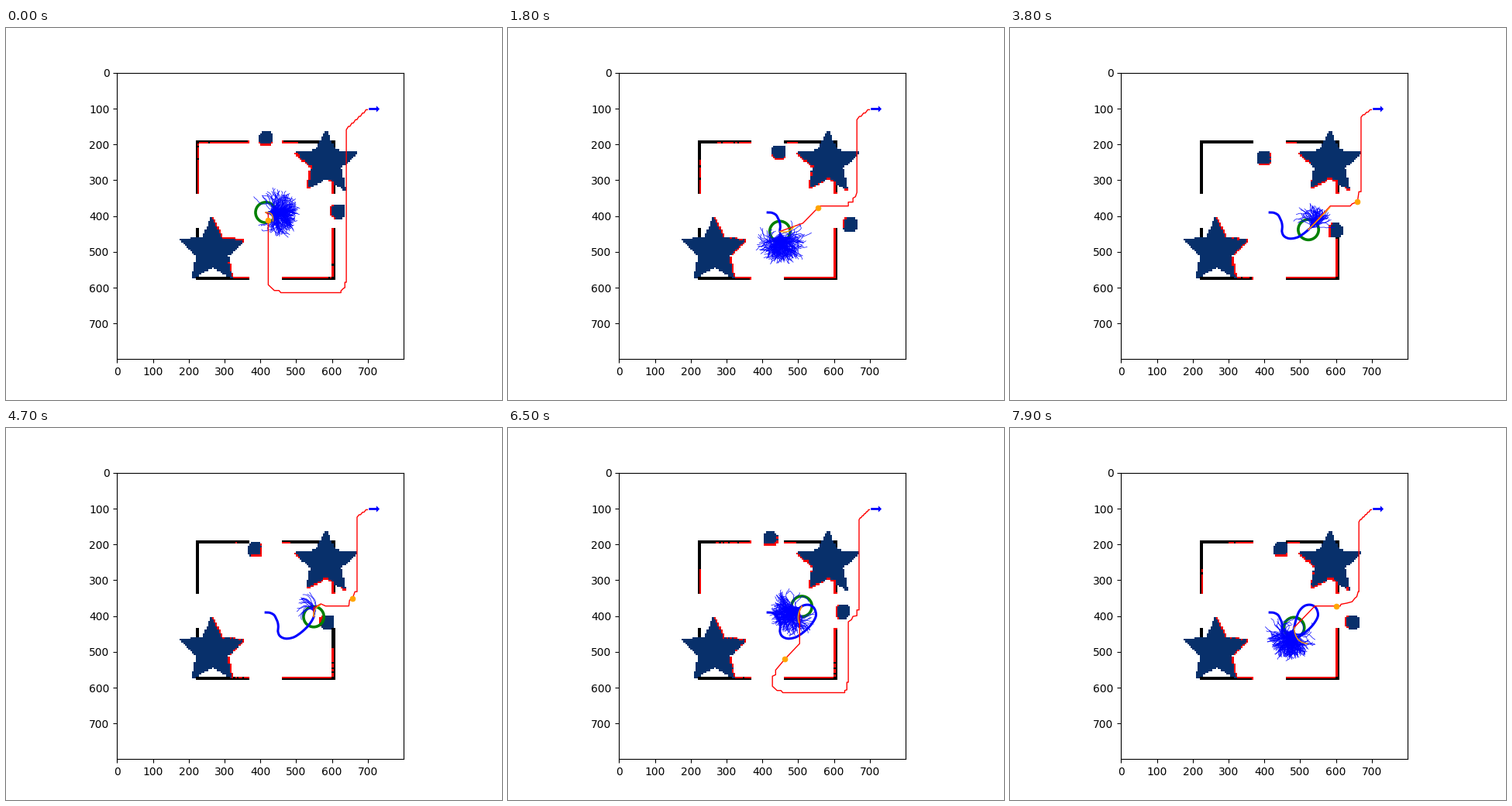
Recreate the animation shown at these times as a matplotlib script. Size 640 px wide and 480 px high, loop 8 s.

```python
import numpy as np
import matplotlib.pyplot as plt
from matplotlib.animation import FuncAnimation
from matplotlib.collections import LineCollection
from matplotlib.colors import ListedColormap
from matplotlib.path import Path

FRAMES, INTERVAL = 80, 100
SIZE, CELL = 800, 5
N = SIZE // CELL
FREE, WALL, BLOCK, HIT = range(4)
LIDAR_RANGE = 300
GOAL = (699, 103)

centers = (np.arange(N) + 0.5) * CELL
GX, GY = np.meshgrid(centers, centers)


def star(cx, cy, r, inner=0.47):
    a = -np.pi / 2 + np.arange(10) * np.pi / 5
    rad = np.where(np.arange(10) % 2, inner * r, r)
    shape = Path(np.c_[cx + rad * np.cos(a), cy + rad * np.sin(a)])
    mask = np.zeros(GX.shape, bool)
    for dx in (-2.4, 2.4):
        for dy in (-2.4, 2.4):
            pts = np.c_[GX.ravel() + dx, GY.ravel() + dy]
            mask |= shape.contains_points(pts).reshape(GX.shape)
    return mask


def static_map():
    grid = np.zeros((N, N), int)
    ring = (GX > 220) & (GX < 610) & (GY > 190) & (GY < 580)
    ring &= ~((GX > 230) & (GX < 600) & (GY > 200) & (GY < 570))
    doors = ((GX > 370) & (GX < 460)) | ((GY > 340) & (GY < 435))
    grid[ring & ~doors] = WALL
    grid[star(267, 497, 94) | star(583, 253, 90)] = BLOCK
    return grid


BASE = static_map()


def world(n):
    """Map with the two circling obstacles placed."""
    grid = BASE.copy()
    a = 0.1 * n - np.pi / 2
    for cx, cy in ((417, 216), (617, 418)):
        dx = abs(GX - cx - 30 * np.cos(a))
        dy = abs(GY - cy - 30 * np.sin(a))
        grid[(np.maximum(dx, dy) < 20) & (dx + dy < 32)] = BLOCK
    return grid


RAYS = np.radians(np.arange(360))[:, None]
REACH = np.arange(0, LIDAR_RANGE, 1.5)[None, :]


def scan(grid, x, y):
    """Mark the first occupied cell along every lidar ray."""
    col = ((x + REACH * np.cos(RAYS)) / CELL).astype(int).clip(0, N - 1)
    row = ((y + REACH * np.sin(RAYS)) / CELL).astype(int).clip(0, N - 1)
    full = grid[row, col] > 0
    i = np.flatnonzero(full.any(axis=1))
    j = full[i].argmax(axis=1)
    out = grid.copy()
    out[row[i, j], col[i, j]] = HIT
    return out


# Robot way points: time step, x, y
WAY = np.array([
    (0, 415, 390), (3, 427, 391), (6, 439, 398), (8, 444, 407),
    (10, 447.5, 415), (14, 450, 429), (18, 449, 443), (21, 453, 454),
    (26, 471, 463), (30, 491, 460), (34, 507, 451), (38, 523, 438),
    (42, 537, 423), (47, 549, 402), (51, 549, 389), (55, 543, 376),
    (59, 531, 369), (62, 520, 369), (65, 510, 373), (69, 497, 387),
    (72, 491, 401), (76, 486, 419), (79, 483, 432)], float)
SLOPE = np.gradient(WAY[:, 1:], WAY[:, 0], axis=0)


def robot(t):
    """Cubic Hermite position for an array of times."""
    t = np.atleast_1d(np.asarray(t, float))
    i = np.clip(np.searchsorted(WAY[:, 0], t, side="right") - 1,
                0, len(WAY) - 2)
    h = (WAY[i + 1, 0] - WAY[i, 0])[:, None]
    u = (t[:, None] - WAY[i, 0][:, None]) / h
    p, q = WAY[i, 1:], WAY[i + 1, 1:]
    return ((2 * u**3 - 3 * u**2 + 1) * p + (3 * u**2 - 2 * u**3) * q
            + h * ((u**3 - 2 * u**2 + u) * SLOPE[i]
                   + (u**3 - u**2) * SLOPE[i + 1]))


def stairs(start, steps, end=GOAL):
    """Grid-like climb from start to end."""
    xs = np.linspace(start[0], end[0], steps + 1)
    ys = np.linspace(start[1], end[1], steps + 1)
    pts = [start]
    for k in range(steps):
        pts += [(xs[k] + 0.6 * (xs[k + 1] - xs[k]), ys[k + 1]),
                (xs[k + 1], ys[k + 1])]
    return pts


RIGHT_END = [(670, 332), *stairs((670, 124), 3)]

# Planned routes and the step at which each one takes over
ROUTES = [
    (0, [(422, 395), (422, 592), (439, 608), (452, 608), (457, 614),
         (625, 614), (625, 609), (632, 602), (636, 600), (636, 585),
         (640, 585), *stairs((640, 159), 6)]),
    (7, [(445, 364), (428, 348), (394, 315), (394, 206), (400, 200),
         (404, 189), (432, 186), (432, 165), (457, 165), (457, 159),
         *stairs((640, 159), 6)]),
    (18, [(513, 420), (560, 372), (640, 372), (640, 361), (653, 361),
          (653, 350), (660, 346), (664, 334), *stairs((664, 131), 3)]),
    (32, [(584, 372), (640, 372), (645, 366), (660, 360), (664, 332),
          *RIGHT_END]),
    (43, [(549, 377), (569, 366), (582, 372), (647, 372), (649, 356),
          (658, 349), (664, 332), *RIGHT_END]),
    (51, [(504, 386), (504, 477), (463, 520), (437, 551), (437, 564),
          (428, 568), (428, 596), (441, 608), (452, 608), (457, 614),
          (630, 614), (630, 608), (636, 606), (636, 585), (640, 585),
          (640, 416), (649, 410), (653, 401), (664, 399), (664, 383),
          (670, 383), *stairs((670, 131), 5)]),
    (74, [(541, 372), (612, 372), (614, 367), (630, 364), (645, 360),
          (653, 350), (658, 346), (662, 332), (664, 332),
          *stairs((664, 137), 5)]),
]


def route(n, pos):
    pts = [p for start, p in ROUTES if start <= n][-1]
    return np.array([tuple(pos), *pts], float)


def along(path, dist):
    s = np.r_[0, np.cumsum(np.hypot(*np.diff(path, axis=0).T))]
    return np.interp(dist, s, path[:, 0]), np.interp(dist, s, path[:, 1])


KEYS = [0, 10, 26, 38, 47, 65, 79]


def keyed(n, *values):
    return np.interp(n, KEYS, values)


def rollouts(n, pos, heading):
    """Noisy sampled motions fanning out ahead of the robot."""
    rng = np.random.default_rng(100 + n)
    count = int(keyed(n, 190, 190, 190, 70, 18, 190, 190))
    noise = keyed(n, .34, .34, .34, .26, .15, .34, .34)
    bend = keyed(n, 0, 0, 0, -.05, -.11, 0, .02)
    pace = keyed(n, 2.0, 2.0, 2.0, 1.6, 1.6, 2.0, 2.0)
    steps = 20
    turn = rng.normal(bend, noise, (count, steps))
    turn += rng.normal(0, .03, (count, 1))
    turn[:, :3] *= 0.3
    ang = heading + np.cumsum(turn, axis=1)
    v = pace / 0.462 * rng.normal(1, .35, (count, steps))
    walk = np.cumsum(np.stack([v * np.cos(ang), v * np.sin(ang)], -1), axis=1)
    return pos + np.concatenate([np.zeros((count, 1, 2)), walk], axis=1)


def forecast(n, pos):
    """Chosen motion as a quadratic curve."""
    ctrl = np.array([keyed(n, 22, 3, 48, 30, 0, -15, 2),
                     keyed(n, -2, 14, -2, -30, -26, 25, 42)])
    end = np.array([keyed(n, 20, 17, 63, 60, 18, -8, 37),
                    keyed(n, 24, 17, -45, -62, -32, 45, 45)])
    u = np.linspace(0, 1, 20)[:, None]
    return pos + 2 * u * (1 - u) * ctrl + u**2 * end


fig, ax = plt.subplots(figsize=(6.4, 4.8), dpi=100)
cmap = ListedColormap(["white", "black", "#08306b", "red"])
image = ax.imshow(BASE, cmap=cmap, vmin=0, vmax=3, interpolation="nearest",
                  extent=(-0.5, SIZE - 0.5, SIZE - 0.5, -0.5))
ax.arrow(703, 101, 21, 0, width=6, head_width=18, head_length=9,
         color="blue", lw=0, zorder=4)
fan = LineCollection([], colors="blue", linewidths=0.5, zorder=3)
ax.add_collection(fan, autolim=False)
ring = plt.Circle((0, 0), 28.5, fill=False, ec="green", lw=2.6, zorder=2.5)
ax.add_patch(ring)
trail, = ax.plot([], [], color="blue", lw=2.2, zorder=4)
guess, = ax.plot([], [], color="orange", lw=1, zorder=5)
plan, = ax.plot([], [], color="red", lw=1, zorder=4.5)
target, = ax.plot([], [], "o", color="orange", ms=5, mew=0.5, zorder=5)
ax.set_xlim(-0.5, SIZE - 0.5)
ax.set_ylim(SIZE - 0.5, -0.5)


def draw(n):
    pos = robot(n)[0]
    a, b = robot([max(n - 1, 0), min(n + 1, FRAMES - 1)])
    heading = np.arctan2(*(b - a)[::-1])
    image.set_data(scan(world(n), *pos))
    fan.set_segments(rollouts(n, pos, heading))
    ring.center = tuple(pos)
    trail.set_data(*robot(np.linspace(0, n, 4 * n + 1)).T)
    guess.set_data(*forecast(n, pos).T)
    path = route(n, pos)
    plan.set_data(*path.T)
    x, y = along(path, keyed(n, 25, 74, 180, 170, 153, 165, 143))
    target.set_data([x], [y])
    return image, fan, ring, trail, guess, plan, target


anim = FuncAnimation(fig, draw, frames=FRAMES, interval=INTERVAL,
                     repeat=True, repeat_delay=0)
plt.show()
```
